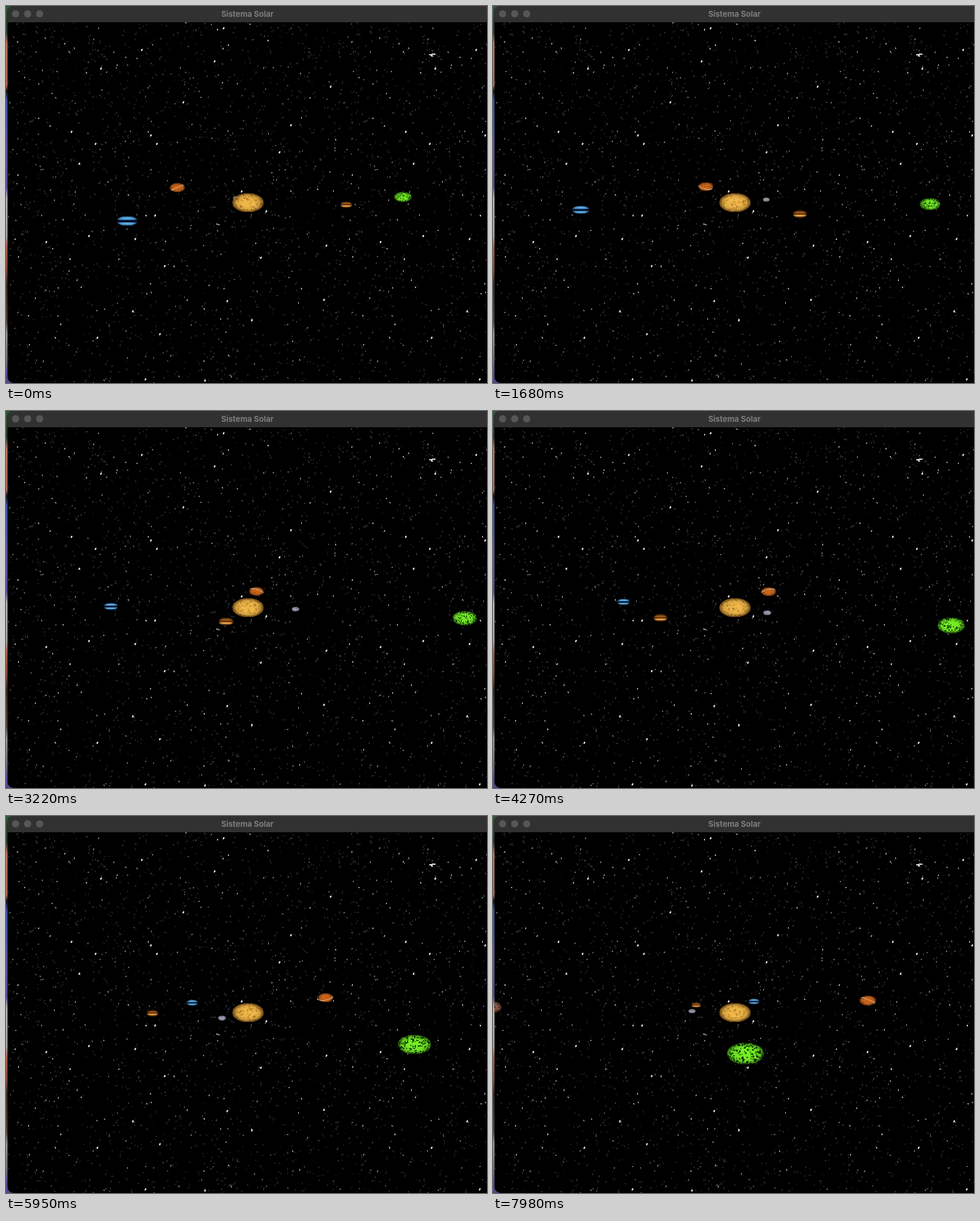
An HTML page with a canvas that plays this animation: 800 by 626 pixels, repeating every 8000 ms.

```html
<!DOCTYPE html>
<html lang="es">
<head>
<meta charset="utf-8">
<title>Sistema Solar</title>
<style>
  html, body { margin: 0; width: 100%; height: 100%; overflow: hidden; background: #000; }
  canvas { position: absolute; left: 0; top: 0; }
  h1 {
    position: absolute; left: 3px; top: 0; width: 797px; margin: 0;
    font: 700 13px/26px Inter, "Liberation Sans", sans-serif;
    text-align: center; color: #7d7d7d;
  }
</style>
</head>
<body>
<canvas id="stage" width="800" height="626"></canvas>
<h1>Sistema Solar</h1>
<script>
const W = 800, H = 626, LOOP = 8000, STEP = 70;
const SUN = { x: 402.5, y: 326.5 };
const DEPTH = 0.0128;   // growth per pixel below the sun
const TILT = 0.1156;    // flattening of the orbits
const SPIN = 70 * Math.PI / 180;
const TIMES = [0, 1.68, 3.22, 4.27, 5.11, 6.79, 7.98];
const ctx = document.getElementById('stage').getContext('2d');

function seeded(seed) {
  return () => {
    seed = (seed + 0x6D2B79F5) | 0;
    let n = Math.imul(seed ^ (seed >>> 15), 1 | seed);
    n = (n + Math.imul(n ^ (n >>> 7), 61 | n)) ^ n;
    return ((n ^ (n >>> 14)) >>> 0) / 4294967296;
  };
}

// Points on the sphere: [longitude, sine of latitude, size]
function speckles(seed, count) {
  const rnd = seeded(seed);
  return Array.from({ length: count }, () => [rnd() * 2 * Math.PI, rnd() * 2 - 1, 0.7 + rnd() * 0.6]);
}

const sun = {
  base: 52, ratio: 0.6, color: '#efb749', edge: 'rgba(75,38,0,.72)',
  spots: [{ color: 'rgba(140,85,15,.38)', w: 0.1, h: 0.13, list: speckles(3, 190) }]
};

const planets = [
  {
    base: 32.8, ratio: 0.58, color: '#74ee24', edge: 'rgba(0,35,0,.6)',
    path: [[660, 317], [727, 329], [763, 344], [762, 356], [737, 367.5], [588, 389], [420, 394.5]],
    spots: [{ color: 'rgba(3,22,0,.88)', w: 0.075, h: 0.11, list: speckles(11, 340) }]
  },
  {
    base: 36.8, ratio: 0.6, color: '#c9661c', edge: 'rgba(45,14,0,.7)', ring: true,
    path: [[285, 301.5], [354, 300], [416.5, 299.5], [458.5, 300], [493.5, 300.5], [570, 303.5], [623.5, 306.5]],
    spots: [{ color: 'rgba(110,45,5,.4)', w: 0.14, h: 0.14, list: speckles(5, 70) }]
  },
  {
    base: 24, ratio: 0.5, color: '#5cb2ec', edge: 'rgba(0,8,40,.55)',
    path: [[201.5, 357], [146, 338.5], [174.5, 324.5], [217, 317], [259.5, 313], [361, 308.5], [434, 308]],
    bands: [[-1, -0.85, '#18324f'], [-0.3, -0.12, '#245a92'], [-0.16, 0.28, '#050d26'], [0.82, 1, '#152c55']]
  },
  {
    base: 18.4, ratio: 0.57, color: '#a8611c', edge: 'rgba(25,8,0,.65)',
    path: [[566, 330], [510.5, 345.5], [366, 349.5], [278.5, 343.5], [243, 336], [271, 320.5], [338, 314]],
    bands: [[-1, -0.6, '#58300c'], [-0.25, 0.2, '#6b350b'], [0.2, 0.58, '#f0a94e'], [0.72, 1, '#4a230a']]
  },
  {
    base: 12.4, ratio: 0.6, color: '#9c98ae', edge: 'rgba(15,10,35,.6)',
    path: [[383, 319], [454.5, 321.5], [481.5, 329], [456, 335], [411, 337], [327, 331], [331, 324]],
    spots: [
      { color: 'rgba(50,50,100,.7)', w: 0.24, h: 0.22, list: speckles(8, 24) },
      { color: 'rgba(215,145,120,.7)', w: 0.2, h: 0.2, list: speckles(9, 18) }
    ]
  },
  {
    base: 38, ratio: 0.6, color: '#8b5c45', edge: 'rgba(15,5,0,.7)',
    times: [7, 7.98], path: [[-36, 322], [-2.5, 317.5]],
    spots: [{ color: 'rgba(40,22,15,.6)', w: 0.13, h: 0.15, list: speckles(14, 90) }]
  }
];

const zoomAt = y => 1 + DEPTH * (y - SUN.y);

function toOrbit([x, y]) {
  const zoom = zoomAt(y);
  const across = (x - SUN.x) / zoom, near = (y - SUN.y) / zoom / TILT;
  return { angle: Math.atan2(near, across), radius: Math.hypot(across, near) };
}

function toScreen(angle, radius) {
  const lift = radius * Math.sin(angle) * TILT;
  const zoom = 1 / (1 - DEPTH * lift);
  return { x: SUN.x + radius * Math.cos(angle) * zoom, y: SUN.y + lift * zoom, zoom };
}

for (const p of planets) {
  p.times = p.times || TIMES;
  const orbit = p.path.map(toOrbit);
  p.radii = orbit.map(o => o.radius);
  p.angles = orbit.map(o => o.angle);
  for (let i = 1; i < p.angles.length; i++)
    while (p.angles[i] < p.angles[i - 1]) p.angles[i] += 2 * Math.PI;
}

// Cubic Hermite curve through the values
function smooth(times, values, t) {
  const last = times.length - 1;
  let i = 0;
  while (i < last - 1 && t > times[i + 1]) i++;
  const slope = k => {
    const a = Math.max(k - 1, 0), b = Math.min(k + 1, last);
    return (values[b] - values[a]) / (times[b] - times[a]);
  };
  const span = times[i + 1] - times[i], u = (t - times[i]) / span, v = 1 - u;
  return values[i] * (1 + 2 * u) * v * v + slope(i) * span * u * v * v
    + values[i + 1] * u * u * (3 - 2 * u) - slope(i + 1) * span * u * u * v;
}

function place(p, t) {
  if (t < p.times[0]) return null;
  return toScreen(smooth(p.times, p.angles, t), smooth(p.times, p.radii, t));
}

function drawBody(body, { x, y, zoom }, t) {
  const rx = body.base * zoom / 2, ry = rx * body.ratio;
  ctx.save();
  ctx.translate(x, y);
  ctx.scale(rx, ry);
  ctx.beginPath();
  ctx.arc(0, 0, 1, 0, 2 * Math.PI);
  ctx.clip();
  ctx.fillStyle = body.color;
  ctx.fillRect(-1, -1, 2, 2);
  for (const [top, bottom, color] of body.bands || []) {
    ctx.fillStyle = color;
    ctx.fillRect(-1, top, 2, bottom - top);
  }
  for (const { color, w, h, list } of body.spots || []) {
    ctx.fillStyle = color;
    for (const [lon, lat, size] of list) {
      const front = Math.cos(lon + SPIN * t);
      if (front < 0) continue;
      const sx = Math.sin(lon + SPIN * t) * Math.sqrt(1 - lat * lat);
      const sw = w * size * (0.45 + 0.55 * front), sh = h * size;
      ctx.fillRect(sx - sw / 2, lat - sh / 2, sw, sh);
    }
  }
  const shade = ctx.createRadialGradient(0, 0, 0.4, 0, 0, 1);
  shade.addColorStop(0, 'rgba(0,0,0,0)');
  shade.addColorStop(0.6, 'rgba(0,0,0,.12)');
  shade.addColorStop(1, body.edge);
  ctx.fillStyle = shade;
  ctx.fillRect(-1, -1, 2, 2);
  if (body.ring) drawRing(t, rx, ry);
  ctx.restore();
}

// Dotted tilted circle that turns with the globe
function drawRing(t, rx, ry) {
  ctx.fillStyle = '#f3dfc4';
  for (let lon = -1.35; lon < 1.4; lon += 0.15) {
    const lat = 0.68 * Math.sin(lon - SPIN * t);
    ctx.fillRect(Math.sin(lon) * Math.cos(lat) - 0.5 / rx, -Math.sin(lat) - 0.5 / ry, 1.1 / rx, 1 / ry);
  }
}

const TILE = 556;
const brightStars = [
  [347, 92], [226, 73], [251, 229], [149, 229], [455, 243], [474, 198], [540, 134], [256, 545],
  [152, 551], [409, 522], [215, 387], [138, 382], [533, 398], [368, 490], [529, 488], [248, 348],
  [433, 341], [211, 507], [241, 215], [109, 209], [295, 160], [158, 104], [362, 37], [67, 392],
  [331, 622], [424, 418], [232, 620], [264, 432], [392, 308], [122, 262]
];

function drawSky(g) {
  const rnd = seeded(42);
  const star = (x, y, w, h, lean, color) => {
    g.fillStyle = color;
    for (const sx of [x, x + TILE]) {
      g.beginPath();
      g.ellipse(sx, y, w, h, lean, 0, 2 * Math.PI);
      g.fill();
    }
  };
  const scatter = (count, size, low, range) => {
    for (let i = 0; i < count; i++) {
      const v = Math.round(low + rnd() * range);
      star(rnd() * TILE, 27 + rnd() * 599, size * (0.6 + rnd() * 0.5), size * (0.9 + rnd() * 1.1),
        (rnd() - 0.5) * 1.4, `rgb(${v},${v},${v})`);
    }
  };
  scatter(1500, 1.1, 24, 24);
  scatter(420, 0.75, 80, 100);
  scatter(170, 0.85, 190, 60);
  for (const [x, y] of brightStars) star(x, y, 1.3, 2.1, 0.5, '#e8e8e8');
  g.fillStyle = '#e6e6e6';
  g.fillRect(704, 80, 5, 2);
  g.fillRect(708, 79, 6, 2);
  g.fillRect(707, 82, 3, 2);
}

function makeBackdrop() {
  const canvas = document.createElement('canvas');
  canvas.width = W;
  canvas.height = H;
  const g = canvas.getContext('2d');
  const desk = g.createLinearGradient(0, 0, 0, H);
  const tones = [
    [0, '#2d5a38'], [0.07, '#253a2a'], [0.1, '#c07a5a'], [0.21, '#b06c50'], [0.225, '#15100e'],
    [0.25, '#3a58a8'], [0.33, '#4a5cae'], [0.37, '#6a58a8'], [0.48, '#5f4e98'], [0.51, '#b8b8b8'],
    [0.61, '#a8a8a8'], [0.64, '#b06048'], [0.7, '#8a5038'], [0.74, '#3c2c22'], [0.84, '#55483e'],
    [0.87, '#9a9a9a'], [0.94, '#70707c'], [0.97, '#57509a'], [1, '#4c468c']
  ];
  for (const [at, color] of tones) desk.addColorStop(at, color);
  g.fillStyle = desk;
  g.fillRect(0, 0, 14, H);
  g.beginPath();
  g.roundRect(2.5, 0, W + 20, H, [9, 0, 0, 10]);
  g.clip();
  g.fillStyle = '#000';
  g.fillRect(0, 0, W, H);
  drawSky(g);
  g.fillStyle = '#313131';
  g.fillRect(0, 0, W, 27);
  g.fillStyle = '#565656';
  for (const x of [16, 36, 56]) {
    g.beginPath();
    g.arc(x, 13, 6, 0, 2 * Math.PI);
    g.fill();
  }
  return canvas;
}

const backdrop = makeBackdrop();

function draw(ms) {
  const t = Math.floor((ms % LOOP) / STEP) * STEP / 1000;
  ctx.drawImage(backdrop, 0, 0);
  ctx.save();
  ctx.beginPath();
  ctx.rect(2, 27, W, H);
  ctx.clip();
  planets.map(body => ({ body, at: place(body, t) }))
    .filter(item => item.at)
    .concat({ body: sun, at: { ...SUN, zoom: 1 } })
    .sort((a, b) => a.at.y - b.at.y)
    .forEach(({ body, at }) => drawBody(body, at, t));
  ctx.restore();
}

function tick() {
  draw(performance.now());
  requestAnimationFrame(tick);
}
tick();
</script>
</body>
</html>
```
